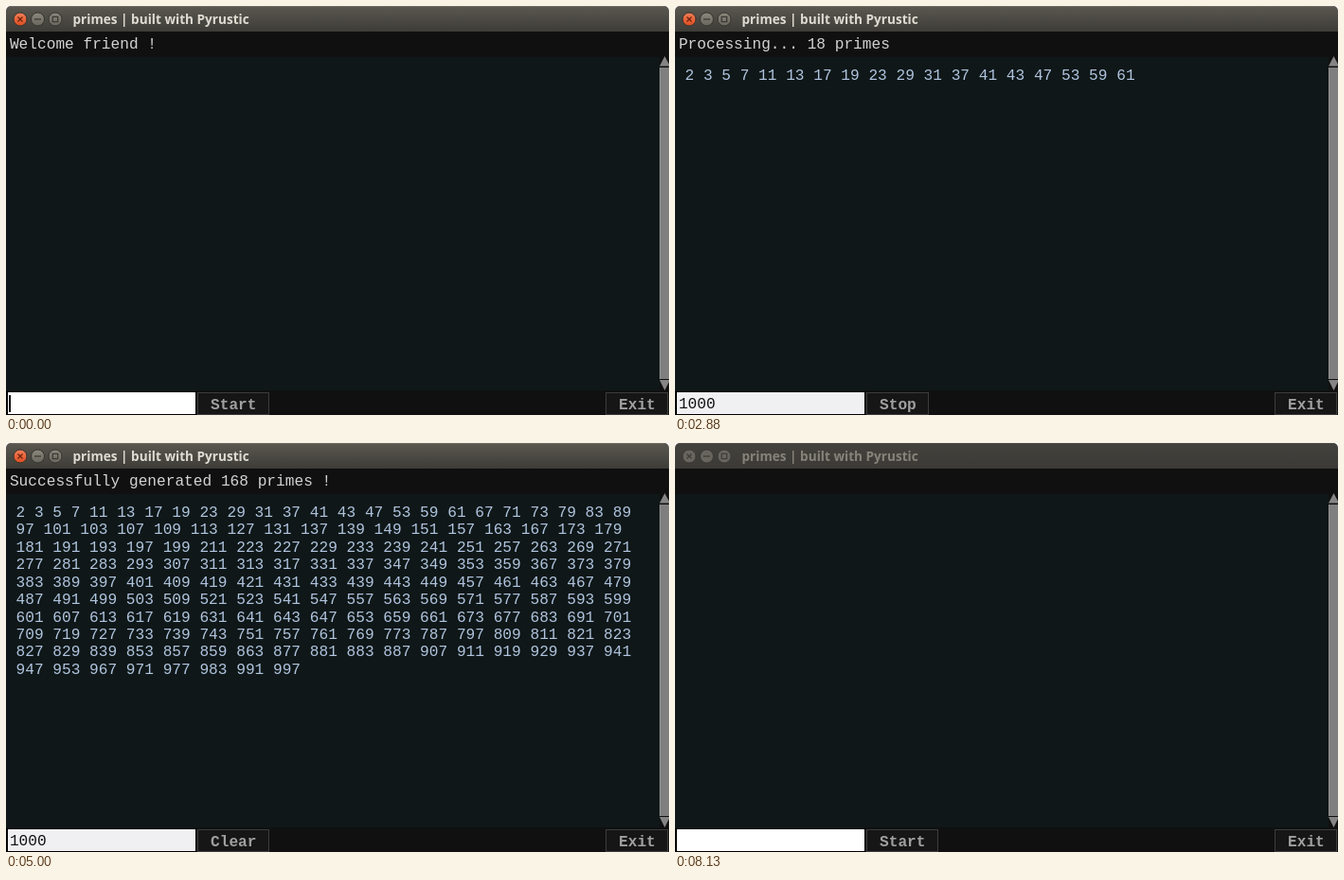
An HTML page with a canvas that plays this animation: 700 by 432 pixels, repeating every 8.25 s.

```html
<!DOCTYPE html>
<html lang="en">
<head>
<meta charset="utf-8">
<title>primes</title>
<style>
  html, body { margin: 0; width: 100%; height: 100%; overflow: hidden; background: #fff; }
  canvas { display: block; }
</style>
</head>
<body>
<canvas id="stage" width="700" height="432"></canvas>
<script>
const ctx = document.getElementById('stage').getContext('2d');
const LOOP = 8250, TICK = 125;
const MONO = '16.17px "Liberation Mono", monospace';
const CHAR = 9.7, LINE = 18.43, WRAP = 67;

// Moments of the session, counted in ticks
const START = 20, DONE = 37, CLEARED = 52, BLUR = 65;

const primes = [];
for (let n = 2; n < 1000; n++) {
  if (primes.every(p => n % p)) primes.push(n);
}

function rect(x, y, w, h, color) {
  ctx.fillStyle = color;
  ctx.fillRect(x, y, w, h);
}

function frame(x, y, w, h, color) {
  ctx.strokeStyle = color;
  ctx.lineWidth = 1;
  ctx.strokeRect(x + .5, y + .5, w - 1, h - 1);
}

function text(str, x, y, color, font = MONO) {
  ctx.font = font;
  ctx.fillStyle = color;
  ctx.fillText(str, x, y);
}

function polygon(points, color) {
  ctx.beginPath();
  points.forEach(([x, y]) => ctx.lineTo(x, y));
  ctx.closePath();
  ctx.fillStyle = color;
  ctx.fill();
}

function gradient(y0, y1, top, bottom) {
  const g = ctx.createLinearGradient(0, y0, 0, y1);
  g.addColorStop(0, top);
  g.addColorStop(1, bottom);
  return g;
}

function windowButton(x, fill, rim, glyph, drawGlyph) {
  ctx.beginPath();
  ctx.arc(x, 14, 7, 0, Math.PI * 2);
  ctx.fillStyle = fill;
  ctx.fill();
  ctx.strokeStyle = rim;
  ctx.lineWidth = 1;
  ctx.stroke();
  ctx.beginPath();
  drawGlyph(x, 14);
  ctx.strokeStyle = glyph;
  ctx.lineWidth = 1.3;
  ctx.stroke();
}

function titleBar(active) {
  ctx.beginPath();
  ctx.roundRect(0, 0, 700, 30, [5, 5, 0, 0]);
  ctx.fillStyle = active ? gradient(0, 27, '#5a5850', '#3d3c37') : gradient(0, 27, '#43423d', '#3b3a36');
  ctx.fill();
  rect(5, 0, 690, 1, active ? '#6c6a61' : '#4d4c46');

  const grey = active ? gradient(7, 21, '#8b887d', '#68665d') : '#67655e';
  const orange = active ? gradient(7, 21, '#f47f58', '#dc4c20') : grey;
  const rim = active ? '#34332e' : '#3a3935';
  const glyph = active ? '#3b3a34' : '#3e3d38';
  windowButton(15, orange, rim, active ? '#6b2410' : glyph, (x, y) => {
    ctx.moveTo(x - 2.5, y - 2.5); ctx.lineTo(x + 2.5, y + 2.5);
    ctx.moveTo(x + 2.5, y - 2.5); ctx.lineTo(x - 2.5, y + 2.5);
  });
  windowButton(33.5, grey, rim, glyph, (x, y) => {
    ctx.moveTo(x - 3.5, y); ctx.lineTo(x + 3.5, y);
  });
  windowButton(52, grey, rim, glyph, (x, y) => ctx.rect(x - 2.7, y - 2.7, 5.4, 5.4));
  text('primes | built with Pyrustic', 70.5, 19, active ? '#dfdbd2' : '#86837a',
    'bold 13.6px "Open Sans", "Noto Sans", sans-serif');
}

function scrollbar() {
  rect(690, 54, 10, 352, '#101010');
  polygon([[695.5, 53], [701, 63.5], [690, 63.5]], '#858585');
  polygon([[690, 395], [701, 395], [695.5, 406]], '#858585');
  rect(690, 65, 10, 329, '#7f7f7f');
  rect(690, 65, 1, 329, '#929292');
}

function button(label, x, hover, pressed) {
  const w = Math.round(label.length * CHAR + 27);
  rect(x, 408, w, 24, '#161616');
  frame(x, 408, w, 24, hover ? '#6b6b6b' : '#3c3c3c');
  if (hover) frame(x + 1, 409, w - 2, 22, '#383838');
  const shift = pressed ? 1 : 0;
  text(label, x + 14 + shift, 426 + shift, hover ? '#cacaca' : '#a0a0a0', 'bold ' + MONO);
}

function entry(value, disabled, caret) {
  rect(0, 407, 201, 25, '#000');
  rect(2, 408, 198, 23, disabled ? '#f0eff2' : '#fff');
  text(value, 3.9, 425, '#111');
  if (caret) rect(3 + value.length * CHAR, 411, 2, 18, '#000');
}

function primeList(count) {
  const lines = [''];
  for (const p of primes.slice(0, count)) {
    const last = lines.length - 1;
    const joined = lines[last] ? lines[last] + ' ' + p : '' + p;
    if (joined.length > WRAP) lines.push('' + p);
    else lines[last] = joined;
  }
  lines.forEach((line, i) => text(line, 10.5, 78 + i * LINE, '#b0c4de'));
}

function hand(x, y) {
  ctx.save();
  ctx.translate(x, y);
  ctx.beginPath();
  ctx.moveTo(-2, 9);
  ctx.lineTo(-2, 1.5);
  ctx.quadraticCurveTo(0, -1.5, 2, 1.5);
  ctx.lineTo(2, 5);
  ctx.quadraticCurveTo(4, 4, 5, 6);
  ctx.quadraticCurveTo(8, 5.5, 8.5, 8);
  ctx.lineTo(8, 12);
  ctx.lineTo(6.5, 16);
  ctx.lineTo(-1, 16);
  ctx.lineTo(-5, 10);
  ctx.quadraticCurveTo(-5, 7, -2, 9);
  ctx.closePath();
  ctx.fillStyle = '#fff';
  ctx.fill();
  ctx.strokeStyle = '#111';
  ctx.lineWidth = 1;
  ctx.stroke();
  ctx.restore();
}

const within = (k, from, to) => k >= from && k < to;

// Distance of the pointer below its resting place, or null while it is away
function pointerDrop(k, press) {
  const d = k - press;
  if (d < -3 || d > 2) return null;
  return d < -1 ? (-1 - d) * 5 : Math.max(0, d - 1) * 8;
}

function draw(now) {
  const k = Math.floor((now % LOOP) / TICK);
  const running = within(k, START, DONE);
  const disabled = within(k, START, CLEARED);
  const count = k >= DONE ? primes.length : Math.max(0, Math.round(18 + (k - 23) * 11.18));

  let status = 'Welcome friend !';
  if (running) status = 'Processing...' + (count ? ` ${count} primes` : '');
  else if (disabled) status = 'Successfully generated 168 primes !';
  else if (k >= CLEARED) status = '';

  const value = k < CLEARED ? '1000'.slice(0, k) : '';
  const caret = [[0, 4], [6, 11], [13, 18], [CLEARED, 57], [59, 64]].some(([a, b]) => within(k, a, b));
  const label = running ? 'Stop' : disabled ? 'Clear' : 'Start';
  const press = k < DONE ? 19 : 51;
  const drop = pointerDrop(k, press);
  const hover = drop !== null;

  ctx.clearRect(0, 0, 700, 432);
  titleBar(k < BLUR);
  rect(0, 27, 700, 405, '#101010');
  rect(0, 54, 690, 352, '#0f1718');
  text(status, 3.9, 45, '#d3d3d3');
  if (disabled) primeList(count);
  scrollbar();
  entry(value, disabled, caret);
  button(label, 202, hover, k === press);
  button('Exit', 633, false, false);
  if (hover) hand(239, 416 + drop);
}

const begin = performance.now();
function loop() {
  draw(performance.now() - begin);
  requestAnimationFrame(loop);
}
loop();
</script>
</body>
</html>
```
